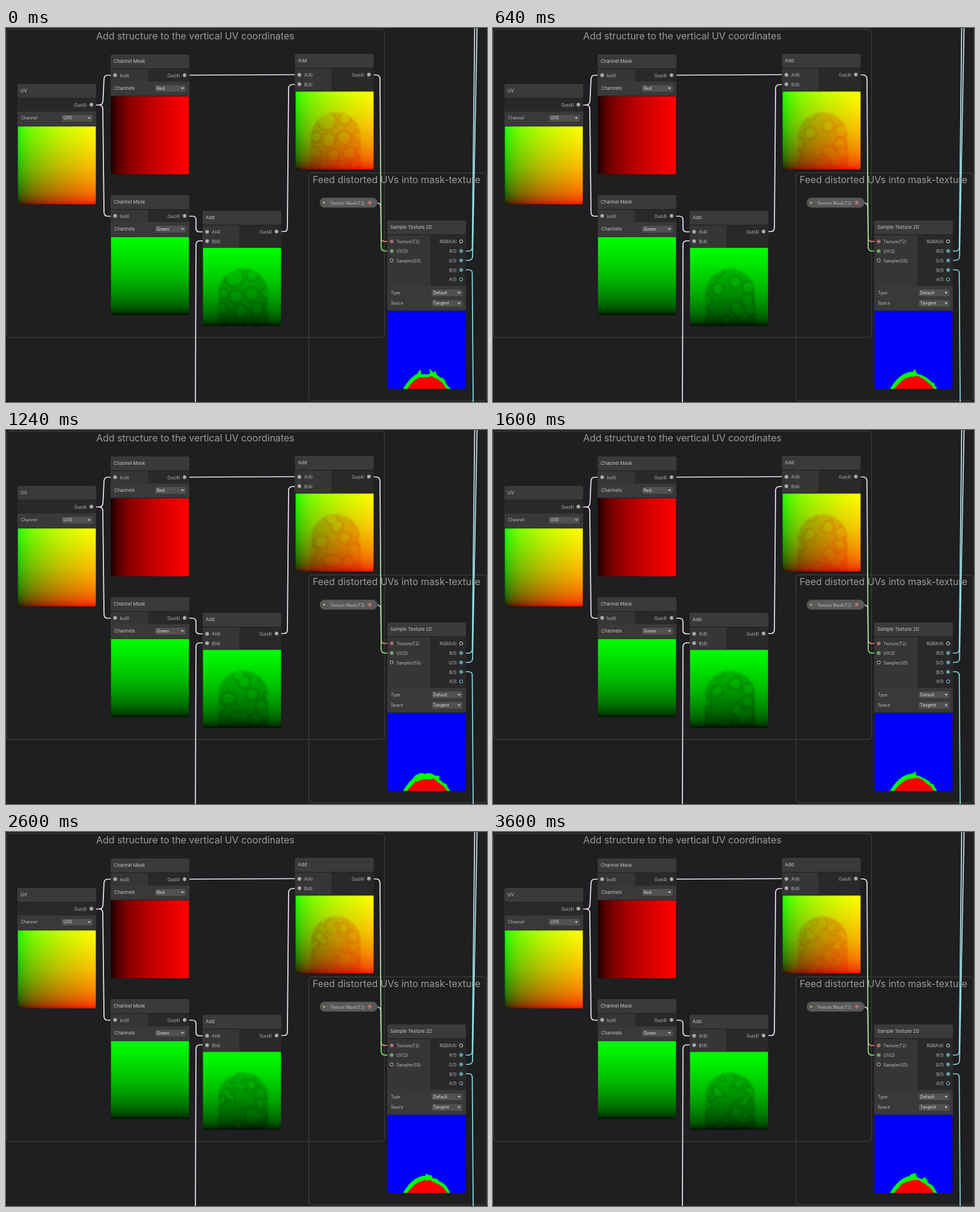
Animation, 800 px wide and 622 px high, one loop 3640 ms. Source, as an HTML page with a canvas:

```html
<!DOCTYPE html>
<html lang="en">
<head>
<meta charset="utf-8">
<title>Shader graph</title>
<style>
html, body { margin: 0; width: 800px; height: 622px; overflow: hidden; background: #1f1e20; }
svg { position: absolute; left: 0; top: 0; }
canvas { position: absolute; border-radius: 0 0 4px 4px; transform: scale(.994); }
text { font-family: Inter, sans-serif; white-space: pre; }
</style>
</head>
<body>
<svg id="graph" width="800" height="622" viewBox="0 0 800 622">
  <defs>
    <linearGradient id="toUv" gradientUnits="userSpaceOnUse" x1="0" y1="78" x2="0" y2="371">
      <stop offset="0" stop-color="#f6e6f6"/><stop offset="1" stop-color="#8ee67e"/>
    </linearGradient>
    <linearGradient id="toTex" gradientUnits="userSpaceOnUse" x1="0" y1="291" x2="0" y2="355">
      <stop offset="0" stop-color="#e8d4d4"/><stop offset="1" stop-color="#f08a86"/>
    </linearGradient>
    <linearGradient id="toTop" gradientUnits="userSpaceOnUse" x1="0" y1="0" x2="0" y2="371">
      <stop offset="0" stop-color="#d4ebf0"/><stop offset="1" stop-color="#86dfe4"/>
    </linearGradient>
  </defs>
</svg>
<script>
const SIZE = 131, LOOP = 3640, STEP = 40;
const svg = document.getElementById('graph');
const WHITE = '#f3e6f4', CYAN = '#86dfe4', RED = '#f58f8f', GREEN = '#96e68a';

function el(name, attrs, content) {
  const e = document.createElementNS('http://www.w3.org/2000/svg', name);
  for (const k in attrs) e.setAttribute(k, attrs[k]);
  if (content) e.textContent = content;
  svg.appendChild(e);
  return e;
}
const rect = (x, y, width, height, fill, rx = 0) => el('rect', { x, y, width, height, fill, rx });
const wire = (d, stroke = WHITE) => el('path', { d, stroke, fill: 'none', 'stroke-width': 1.7 });
function label(x, mid, str, size = 6.9, fill = '#bdbdbd', anchor = 'start') {
  el('text', { x, y: mid + size * 0.36, 'font-size': size, fill, 'text-anchor': anchor }, str);
}
function port(x, y, color, linked = true) {
  el('circle', { cx: x, cy: y, r: 2.6, fill: '#1b1b1b', stroke: color, 'stroke-width': 1 });
  if (linked) el('circle', { cx: x, cy: y, r: 1.4, fill: color });
}
function input(x, y, str, color, linked) {
  port(x, y, color, linked);
  label(x + 8, y + 0.7, str);
}
function output(x, y, str, color, linked) {
  port(x, y, color, linked);
  label(x - 7.5, y + 0.7, str, 6.9, '#bdbdbd', 'end');
}
function dropdown(x, mid, str, size = 6.9) {
  rect(x, mid - 5.5, 51, 11, '#515152', 2);
  label(x + 2.5, mid, str, size, '#e0e0e0');
  el('path', { d: `M${x + 43} ${mid - 1.4}h5l-2.5 3z`, fill: '#c8c8c8' });
}
// Node body: header, port block split at "split", optional controls, then the preview.
function node(x, y, title, split, portsEnd, previewY) {
  rect(x, y, SIZE, previewY - y + 8, '#252526', 3);
  rect(x, y, SIZE, 23, '#3a3a3b', 3);
  if (split) rect(x, y + 24.5, split, portsEnd - y - 24.5, '#363637');
  rect(x + split, y + 24.5, SIZE - split, portsEnd - y - 24.5, '#29292a');
  if (previewY - portsEnd > 4) rect(x, portsEnd, SIZE, previewY - portsEnd - 0.5, '#39393a');
  label(x + 5, y + 11.5, title, 7.8, '#c4c4c4');
}
function group(x, y, width, height) {
  el('rect', { x, y, width, height, rx: 5, fill: 'none', stroke: '#39393b', 'stroke-width': 1.5 });
}

group(1, 2.5, 628.5, 512);
group(503.5, 241, 295.5, 378.5);
label(150, 13.5, 'Add structure to the vertical UV coordinates', 15.9, '#9b9b9c');

wire('M142 128H155Q161 128 161.3 121L163 85Q163.5 78.5 169 78.5H181');
wire('M155 128Q161 128 161 135L163 306Q163 313 169 313H181');
wire('M297 78.5L488 77.5');
wire('M297 313H310Q316 313 316 319V333Q316 339 322 339H334');
wire('M334 354H322Q316 354 316 361L315 622');
wire('M450 338.5H462Q468 338.5 468 332L470 101Q470 94 477 94H488');
wire('M605 291H617Q623 291 623.3 297L624 349Q624 355 630 355H641', 'url(#toTex)');
wire('M604 78H615Q622 78 622 85L624 364Q624 371 630 371H641', 'url(#toUv)');
wire('M757 371H769Q775 371 775.5 365L779.5 0', 'url(#toTop)');
wire('M757 386.5H769Q775.5 386.5 776 380L783.5 0', 'url(#toTop)');
wire('M757 402H769Q775.5 402 775.5 408L777 622', CYAN);
label(510, 252.5, 'Feed distorted UVs into mask-texture', 15.9, '#9b9b9c');

node(19, 93, 'UV', 0, 139, 163);
output(142, 127.5, 'Out(4)', WHITE);
label(25, 150, 'Channel');
dropdown(93, 150, 'UV0');

for (const [y, name] of [[44, 'Red'], [278, 'Green']]) {
  node(174, y, 'Channel Mask', 62, y + 45, y + 69);
  input(181.5, y + 34.5, 'In(4)', WHITE);
  output(297, y + 34.5, 'Out(4)', WHITE);
  label(180, y + 56.5, 'Channels', 7.8, '#c4c4c4');
  dropdown(248, y + 56.5, name, 7.3);
}
for (const [x, y] of [[480.5, 43], [327, 304]]) {
  node(x, y, 'Add', 61, y + 61, y + 61);
  input(x + 7.5, y + 35, 'A(4)', WHITE);
  input(x + 7.5, y + 50.5, 'B(4)', WHITE);
  output(x + 123, y + 34.5, 'Out(4)', WHITE);
}

el('rect', { x: 522, y: 282.5, width: 95.5, height: 16, rx: 7.5, fill: '#59595a', stroke: '#454546' });
el('circle', { cx: 529, cy: 290.5, r: 1.5, fill: '#a4e070' });
label(539, 291.5, 'Texture Mask(T2)');
port(605, 290.5, RED);

node(634, 320, 'Sample Texture 2D', 72, 429, 470);
input(641.5, 355, 'Texture(T2)', RED);
input(641.5, 371, 'UV(2)', GREEN);
input(641.5, 386.5, 'Sampler(SS)', '#dddddd', false);
['RGBA(4)', 'R(1)', 'G(1)', 'B(1)', 'A(1)'].forEach((s, i) =>
  output(757, 355 + i * 15.8, s, i ? CYAN : WHITE, i > 0 && i < 4));
label(640, 440.5, 'Type');
dropdown(708, 440.5, 'Default');
label(640, 458, 'Space');
dropdown(708, 458, 'Tangent');

// Previews
const clamp = v => Math.max(0, Math.min(1, v));
const srgb = Array.from({ length: 1025 }, (_, i) => {
  const c = i / 1024;
  return 255 * (c < 0.0031308 ? 12.92 * c : 1.055 * c ** (1 / 2.4) - 0.055);
});
const gamma = v => srgb[Math.round(clamp(v) * 1024)];

function preview(left, top, shade) {
  const c = document.createElement('canvas');
  c.width = c.height = SIZE;
  c.style.left = left + 'px';
  c.style.top = top + 'px';
  document.body.appendChild(c);
  const ctx = c.getContext('2d'), img = ctx.createImageData(SIZE, SIZE);
  return () => {
    for (let y = 0, p = 0; y < SIZE; y++) {
      for (let x = 0; x < SIZE; x++, p += 4) {
        const [r, g, b] = shade(x, y);
        img.data[p] = r;
        img.data[p + 1] = g;
        img.data[p + 2] = b;
        img.data[p + 3] = 255;
      }
    }
    ctx.putImageData(img, 0, 0);
  };
}

const U = x => (x + 0.5) / SIZE, V = y => 1 - (y + 0.5) / SIZE;
preview(19, 162.5, (x, y) => [gamma(U(x)), gamma(V(y)), 0])();
preview(174, 112.5, x => [gamma(U(x)), 0, 0])();
preview(174, 347, (x, y) => [0, gamma(V(y)), 0])();

// Drifting cells: x, y, radius
const cells = [
  [52, 49, 16], [82, 46, 10], [104, 47, 8], [34, 76, 9], [55, 81, 12], [81, 77, 12], [105, 75, 9],
  [32, 102, 10], [63, 106, 11], [90, 103, 11], [110, 101, 9], [48, 124, 9], [78, 125, 9], [98, 124, 8]
];
const noise = new Float32Array(SIZE * SIZE), cover = new Float32Array(SIZE * SIZE);

function dome(x, y) {
  const dx = Math.abs(x - 67);
  const d = 44 - (y < 76 ? Math.hypot(dx, y - 76) : dx - (y - 76) * 0.03);
  return clamp(d / 5);
}
for (let i = 0; i < cover.length; i++) cover[i] = dome(i % SIZE, Math.floor(i / SIZE));

function updateNoise(t) {
  const late = clamp((t - 1000) / 1500), width = 3.2 + late * 1.5, warp = 4 * late;
  const now = cells.map(([x, y, r], i) => {
    const a = t / 1000 * (6.3 + 0.5 * Math.sin(i * 2.4)), ph = i * 2.1;
    return [
      x + 8 * (Math.sin(a + ph) - Math.sin(ph)),
      y + 7 * (Math.cos(a + ph * 1.4) - Math.cos(ph * 1.4)),
      r + (10.5 - r) * clamp(t / 400)
    ];
  });
  const s = t / 1000;
  for (let i = 0; i < noise.length; i++) {
    if (!cover[i]) continue;
    const px = i % SIZE, py = Math.floor(i / SIZE);
    const x = px + warp * Math.sin(py * 0.27 + s * 3) + warp * 0.5 * Math.sin(px * 0.41 + py * 0.35 - s * 4);
    const y = py + warp * Math.sin(px * 0.24 - s * 2.6) + warp * 0.5 * Math.cos(py * 0.45 - px * 0.3 + s * 3);
    let near = 99;
    for (const [cx, cy, r] of now) near = Math.min(near, Math.hypot(x - cx, y - cy) - r);
    const ring = Math.exp(-((near / width) ** 2));
    const fill = near > 0 ? 0.55 : 0.15 + 0.3 * late * clamp(1 + near / 9);
    noise[i] = cover[i] * Math.max(ring, fill);
  }
}

const distorted = (x, y) => {
  const i = y * SIZE + x;
  return V(y) * (1 - cover[i] * 0.2 - noise[i] * 0.29);
};
function maskColor(x, y) {
  const n = noise[y * SIZE + x], up = SIZE - y;
  const arch = (mid, half, h, p) => h * (1 - clamp(Math.abs(x - mid) / half) ** p);
  const lift = clamp(1.3 - Math.abs(x - 65) / 36);
  if (up < arch(66, 33.5, 20, 2.3) + 3 * n * lift) return [255, 0, 0];
  if (up < arch(65, 39.5, 24.5, 2.4) + 9 * n * lift) return [0, 255, 0];
  return [0, 0, 255];
}

const live = [
  preview(480.5, 104.5, (x, y) => [gamma(U(x)), gamma(distorted(x, y)), 0]),
  preview(327, 365, (x, y) => [0, gamma(distorted(x, y)), 0]),
  preview(634, 470, maskColor)
];

let last = -1;
function draw(ms) {
  const t = Math.floor(ms % LOOP / STEP) * STEP;
  if (t !== last) {
    last = t;
    updateNoise(t);
    live.forEach(paint => paint());
  }
}
function tick() {
  draw(performance.now());
  requestAnimationFrame(tick);
}
tick();
</script>
</body>
</html>
```
